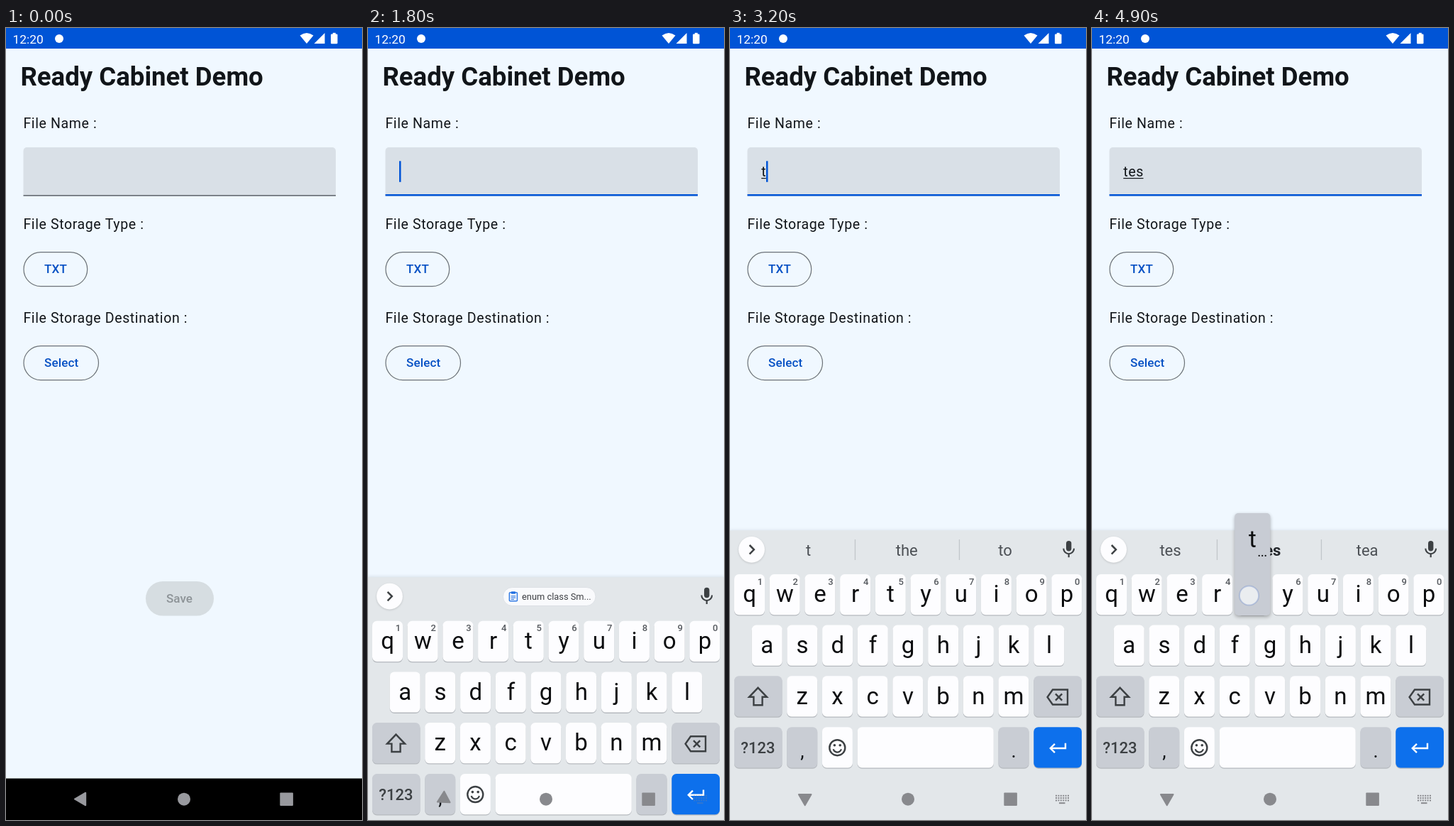
Recreate the animation shown at these times as an HTML page with a canvas. Size 502 by 1115 pixels, loop 5.1 s.

```html
<!DOCTYPE html>
<html lang="en">
<head>
<meta charset="utf-8">
<title>Ready Cabinet Demo</title>
<style>
html, body { margin: 0; width: 100%; height: 100%; overflow: hidden; background: #f0f8ff; }
canvas { display: block; width: 502px; height: 1115px; }
</style>
</head>
<body>
<canvas id="stage"></canvas>
<script>
const W = 502, H = 1115, LOOP = 5100, STEP = 100;
const BLUE = '#0054d6', INK = '#111519', ICON = '#3c4043', PITCH = 49.7;
const canvas = document.getElementById('stage');
const ctx = canvas.getContext('2d');
const dpr = window.devicePixelRatio || 1;
canvas.width = W * dpr;
canvas.height = H * dpr;

const within = (t, a, b) => t >= a && t < b;
const clamp = v => Math.max(0, Math.min(1, v));

function text(s, x, y, size, color, { weight = 400, align = 'left', gap = 0 } = {}) {
  ctx.font = `${weight} ${size}px Roboto, sans-serif`;
  ctx.letterSpacing = gap + 'px';
  ctx.textAlign = align;
  ctx.fillStyle = color;
  ctx.fillText(s, x, y);
  return ctx.measureText(s).width;
}

const center = (s, x, y, size, color, weight = 400) =>
  text(s, x, y, size, color, { weight, align: 'center' });

function box(x, y, w, h, r, fill, stroke, line = 1.2) {
  ctx.beginPath();
  ctx.roundRect(x, y, w, h, r);
  paint(fill, stroke, line);
}

function disc(x, y, r, fill, stroke, line) {
  ctx.beginPath();
  ctx.arc(x, y, r, 0, Math.PI * 2);
  paint(fill, stroke, line);
}

function poly(points, fill, stroke, line, open) {
  ctx.beginPath();
  points.forEach(([x, y]) => ctx.lineTo(x, y));
  if (!open) ctx.closePath();
  paint(fill, stroke, line);
}

function paint(fill, stroke, line) {
  if (fill) { ctx.fillStyle = fill; ctx.fill(); }
  if (stroke) { ctx.strokeStyle = stroke; ctx.lineWidth = line; ctx.stroke(); }
}

function shadow(color, blur, dy) {
  ctx.shadowColor = color;
  ctx.shadowBlur = blur * dpr;
  ctx.shadowOffsetY = dy * dpr;
}
const noShadow = () => shadow('transparent', 0, 0);

function statusBar() {
  box(0, 0, W, 29, 0, BLUE);
  text('12:20', 9.5, 21.5, 17.4, '#fff');
  disc(75, 15, 6, '#fff');
  ctx.beginPath();
  ctx.moveTo(424, 22);
  ctx.lineTo(414.5, 10.6);
  ctx.quadraticCurveTo(424, 3.2, 433.5, 10.6);
  ctx.closePath();
  paint('#fff');
  poly([[434.5, 22], [449.5, 22], [449.5, 7]], '#fff');
  box(458, 8.5, 9.5, 13.8, 1.3, '#fff');
  box(460.8, 6.8, 4, 3, 0, '#fff');
}

function pillButton(label, y, w) {
  box(25, y, w, 48, 24, null, '#6c7277');
  text(label, 54, y + 29.7, 17.1, '#0650c4', { weight: 500, gap: 0.12 });
}

function form(t) {
  const label = (s, y) => text(s, 24.4, y, 19.54, INK, { gap: 0.61 });
  text('Ready Cabinet Demo', 20.4, 81, 36.6, INK, { weight: 700 });
  label('File Name :', 141);
  label('File Storage Type :', 283);
  label('File Storage Destination :', 414.5);
  pillButton('TXT', 315.7, 89.7);
  pillButton('Select', 447.6, 105.5);
  box(197, 779, 96, 48.5, 24.2, '#d6dde1');
  center('Save', 244.5, 809, 17.1, '#8d9397', 500);

  const focused = t >= 1400;
  box(24.5, 168, 440.5, 68.5, [4.9, 4.9, 0, 0], '#d9e0e7');
  if (focused) box(24.5, 234, 440.5, 2.6, 0, BLUE);
  else box(24.5, 235.3, 440.5, 1.2, 0, '#454a50');

  const typed = t < 3200 ? '' : t < 4000 ? 't' : t < 4300 ? 'te' : 'tes';
  const w = text(typed, 44.2, 209, 19.54, INK, { gap: 0.61 });
  if (typed) box(44.2, 211, w - 0.4, 1.2, 0, INK);
  const caret = within(t, 1400, 1900) || within(t, 2400, 2900) ||
    within(t, 3200, 3700) || within(t, 4000, 4800);
  if (caret) box(44 + w, 187.3, 2.5, 29.5, 0, BLUE);
}

function key(x, y, w, fill = '#fdfdff') {
  box(x, y + 1.3, w, 57.2, 6.5, '#b5b9be');
  box(x, y, w, 57.2, 6.5, fill);
}

function letterRow(letters, x0, y, hints) {
  [...letters].forEach((c, i) => {
    const x = x0 + i * PITCH;
    key(x, y, 43);
    center(c, x + 21.6, y + 39.3, 33, '#0c0d0f');
    if (hints) center(hints[i], x + 36.5, y + 14.5, 13, '#55595e', 500);
  });
}

function toolbar(t, grow) {
  shadow('rgba(0,0,0,.15)', 3, 1);
  disc(30.5, 734.3, 18.4, '#fdfdff');
  noShadow();
  poly([[27.6, 728], [33.8, 734.3], [27.6, 740.6]], null, ICON, 2.5, true);

  box(474, 722, 7.4, 14.4, 3.7, ICON);
  ctx.beginPath();
  ctx.arc(477.7, 732.8, 7.4, 0, Math.PI);
  paint(null, ICON, 2.1);
  box(476.6, 740, 2.2, 5.2, 0, ICON);

  if (t < 3200) { clipChip(grow); return; }
  const words = t < 4100 ? ['t', 'the', 'to'] :
    t < 4400 ? ['te', 'the', 'yes'] : ['tes', 'yes', 'tea'];
  const strong = t >= 4100;
  words.forEach((s, i) => {
    const mid = strong && i === 1;
    center(s, 110.5 + i * 138.8, 743, 22, mid ? '#24272b' : '#4c5055', mid ? 700 : 400);
  });
  box(175.8, 720, 1.3, 29, 0, '#c2c6ca');
  box(322.8, 720, 1.3, 29, 0, '#c2c6ca');
}

function clipChip(grow) {
  ctx.save();
  ctx.translate(255.7, 734.7);
  ctx.scale(grow, grow);
  ctx.globalAlpha = clamp(grow * 1.25);
  box(-94.5, -18.8, 189, 37.6, 18.8, '#fdfdff', '#d6dadf', 1.2);
  box(-81.6, -8.4, 16, 17.6, 1.5, null, '#1467e0', 2.2);
  box(-78, -10.6, 8.8, 5, 1, '#1467e0');
  [-2, 1.4, 4.8].forEach((y, i) => box(-78.4, y, i < 2 ? 9.6 : 6.4, 1.7, 0, '#1467e0'));
  text('enum class Sm...', -56, 6.6, 18.6, '#1f2226');
  ctx.restore();
}

function keyboard(t, grow) {
  const gray = '#c9cdd4';
  shadow('rgba(40,60,80,.12)', 4, -1);
  box(0, 707.5, W, 420, 0, '#e3e7ea');
  noShadow();
  toolbar(t, grow);
  letterRow('qwertyuiop', 6, 769, '1234567890');
  letterRow('asdfghjkl', 30.7, 840.6);
  letterRow('zxcvbnm', 80.2, 912.3);

  key(6, 912.3, 67.5, gray);
  poly([[39.5, 928.8], [52, 941.8], [45.6, 941.8], [45.6, 953.2], [33.4, 953.2], [33.4, 941.8], [27, 941.8]],
    null, ICON, 2.4);
  key(428.3, 912.3, 67.7, gray);
  poly([[447.6, 942], [455, 931.5], [476, 931.5], [476, 952.5], [455, 952.5]], null, ICON, 2.4);
  poly([[459, 937.4], [468.2, 946.6]], null, ICON, 2.4);
  poly([[468.2, 937.4], [459, 946.6]], null, ICON, 2.4);

  const y = 984.2;
  key(6, y, 67.5, gray);
  center('?123', 39.3, 1021, 22, ICON, 500);
  key(80.2, y, 43, gray);
  center(',', 102, 1027, 27, INK);
  key(129.9, y, 43);
  disc(151.3, 1013.2, 11, null, ICON, 2.4);
  disc(147.4, 1009.8, 1.8, ICON);
  disc(155.2, 1009.8, 1.8, ICON);
  ctx.beginPath();
  ctx.arc(151.3, 1013.8, 5.8, 0.25, Math.PI - 0.25);
  paint(null, ICON, 2.2);
  key(179.6, y, 192.2);
  key(378.5, y, 43, gray);
  center('.', 400, 1027, 27, INK);
  key(428.3, y, 67.7, '#0d70ec');
  poly([[473, 1006.8], [473, 1014], [452.5, 1014]], null, '#fff', 2.4, true);
  poly([[458, 1007.8], [451.8, 1014], [458, 1020.2]], null, '#fff', 2.4, true);
}

function navIcons(u) {
  const color = u > 0.3 ? '#88898d' : '#98999e';
  ctx.save();
  ctx.translate(105.7, 1085.5);
  ctx.rotate(-Math.PI / 2 * u * u);
  ctx.lineJoin = 'round';
  poly([[-8.8, 0], [6.5, -8.8], [6.5, 8.8]], color, color, 2);
  ctx.restore();
  disc(251, 1085.7, 9, color);
  box(386.3, 1076.5, 18.6, 18.6, 1, color);

  ctx.globalAlpha = u * u;
  for (let row = 0; row < 3; row++)
    for (let i = 0; i < 6; i++)
      box(459 + i * 3.4, 1079.8 + row * 3.3, 2, 2, 0, color);
  box(464, 1090.2, 8.5, 2, 0, color);
  ctx.globalAlpha = 1;
}

function popup(c, x, y) {
  shadow('rgba(0,0,0,.3)', 5, 2);
  box(x, y, 50, 144, 5, '#c8ccd4');
  noShadow();
  center(c, x + 25, y + 48.2, 33, '#0c0d0f');
  center('...', x + 39, y + 61, 16, '#0c0d0f', 500);
}

function touch(x, y) {
  disc(x, y, 13.6, 'rgba(250,252,253,.68)', 'rgba(125,150,205,.42)', 2);
}

function draw(t) {
  ctx.setTransform(dpr, 0, 0, dpr, 0, 0);
  box(0, 0, W, H, 0, '#f0f8ff');
  statusBar();
  form(t);
  box(0, 1056.5, W, 60, 0, '#000');

  const u = clamp((t - 1550) / 450);
  if (u > 0) {
    const left = Math.pow(1 - u, 2.25);
    ctx.save();
    ctx.translate(0, 408 * left);
    keyboard(t, 1 - left * 1.92 > 0.1 ? 1 - left * 1.92 : 0.1);
    ctx.restore();
  }
  navIcons(u);

  if (within(t, 1200, 1400)) touch(170, 219.5);
  if (within(t, 3000, 3200) || t >= 4900) {
    popup('t', 201.3, 683);
    touch(221.5, 799);
  }
  if (within(t, 3800, 4000)) {
    popup('e', 101.9, 683);
    touch(122, 799);
  }
  if (within(t, 4200, 4300)) {
    popup('s', 77, 754.3);
    touch(97, 864);
  }
}

const start = performance.now();
function tick() {
  const t = (performance.now() - start) % LOOP;
  draw(Math.floor(t / STEP) * STEP);
  requestAnimationFrame(tick);
}
tick();
</script>
</body>
</html>
```
